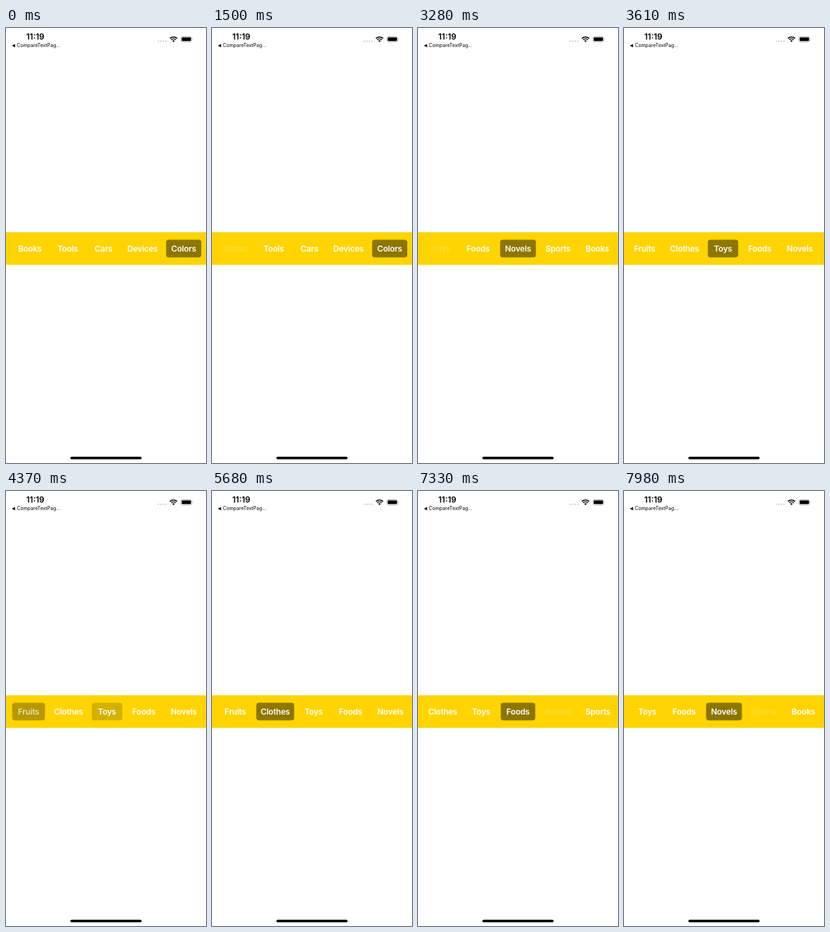
These frames come from a looping animation (296x640 px, 8 s). An HTML page:

```html
<!DOCTYPE html>
<html lang="en">
<head>
<meta charset="utf-8">
<title>Category bar</title>
<style>
  html, body { margin: 0; width: 100%; height: 100%; overflow: hidden; background: #fff; }
  svg { display: block; width: 296px; height: 640px; }
  text { font-family: Inter, "Liberation Sans", sans-serif; }
  .clock { font-size: 12px; font-weight: 600; text-anchor: middle; }
  .back { font-size: 7.2px; }
  .item text { font-size: 12px; font-weight: 600; letter-spacing: -.2px; text-anchor: middle; fill: #fff; }
  .item rect { fill: #000; fill-opacity: .45; }
</style>
</head>
<body>
<svg viewBox="0 0 296 640">
  <text class="clock" x="43.4" y="16.6">11:19</text>
  <path d="M8.8 25.9 13.4 23.4V28.4Z"/>
  <text class="back" x="16" y="28.4">CompareTextPag...</text>

  <g fill="#bdbdbd">
    <circle cx="225.6" cy="19.6" r="1"/>
    <circle cx="229.3" cy="19.6" r="1"/>
    <circle cx="233" cy="19.6" r="1"/>
    <circle cx="236.7" cy="19.6" r="1"/>
  </g>
  <g fill="none" stroke="#000" stroke-width="1.6">
    <path d="M242.6 15.4a7.6 7.6 0 0 1 10.6 0"/>
    <path d="M244.5 17.4a4.9 4.9 0 0 1 6.8 0"/>
  </g>
  <path d="M246.1 18.9a2.6 2.6 0 0 1 3.6 0L247.9 20.8Z"/>
  <rect x="258.8" y="12.5" width="16.2" height="8" rx="2.4" fill="none" stroke="#a8a8a8" stroke-width=".8"/>
  <rect x="260" y="13.7" width="13.8" height="5.6" rx="1.4"/>
  <path d="M276 15.2q1.2 1.3 0 2.6Z" fill="#a8a8a8"/>

  <rect y="300.5" width="296" height="48" fill="#ffd400"/>
  <g id="track"></g>

  <rect x="95.3" y="630.8" width="105.4" height="3.8" rx="1.9"/>
</svg>
<script>
const LOOP = 8000, MAX_SCROLL = 346, MIDDLE = 148;
const TICK = 105, LEAD = 70, DURATION = 300, PRESSED = .2;

// name, centre, pill width
const items = [
  ['Fruits', 34.4, 48.5], ['Clothes', 93.6, 56], ['Toys', 150.5, 45],
  ['Foods', 205, 51], ['Novels', 264, 53], ['Sports', 323.2, 53],
  ['Books', 381.5, 51], ['Tools', 437.3, 50], ['Cars', 490.2, 45],
  ['Devices', 548, 57], ['Colors', 609, 52]
];

// item, press time, release time
const taps = [
  ['Books', 1500, 1730], ['Novels', 2490, 2600], ['Toys', 3280, 3390],
  ['Fruits', 4150, 4260], ['Clothes', 5360, 5470], ['Toys', 5880, 5990],
  ['Foods', 6670, 6780], ['Novels', 7330, 7440], ['Sports', 7980, 8090]
];

const track = document.getElementById('track');
const cells = {};

function add(parent, tag, attrs) {
  const el = document.createElementNS('http://www.w3.org/2000/svg', tag);
  for (const key in attrs) el.setAttribute(key, attrs[key]);
  return parent.appendChild(el);
}

for (const [name, x, width] of items) {
  const g = add(track, 'g', { class: 'item' });
  const pill = add(g, 'rect', { x: x - width / 2, y: 311.4, width, height: 26.2, rx: 4 });
  const label = add(g, 'text', { x, y: 328.9 });
  label.textContent = name;
  const scroll = Math.min(MAX_SCROLL, Math.max(0, x - MIDDLE));
  cells[name] = { pill, label, scroll };
}

// Eased progress, advancing in discrete ticks after release.
function progress(elapsed) {
  const snapped = Math.floor(elapsed / TICK) * TICK;
  const p = Math.min(1, (snapped + LEAD) / DURATION);
  return p * p * (3 - 2 * p);
}

function render(t) {
  const pills = { Colors: 1 }, labels = {};
  let selected = 'Colors', scroll = MAX_SCROLL;

  for (const [name, press, release] of taps) {
    if (t < press) break;
    if (t < release) {
      labels[name] = PRESSED;
      break;
    }
    const p = progress(t - release);
    scroll += (cells[name].scroll - scroll) * p;
    pills[selected] = 1 - p;
    pills[name] = p;
    labels[name] = PRESSED + (1 - PRESSED) * p;
    selected = name;
  }

  track.setAttribute('transform', `translate(${-scroll} 0)`);
  for (const name in cells) {
    cells[name].pill.style.opacity = pills[name] ?? 0;
    cells[name].label.style.opacity = labels[name] ?? 1;
  }
}

const start = performance.now();
function loop() {
  render((performance.now() - start) % LOOP);
  requestAnimationFrame(loop);
}
loop();
</script>
</body>
</html>
```
